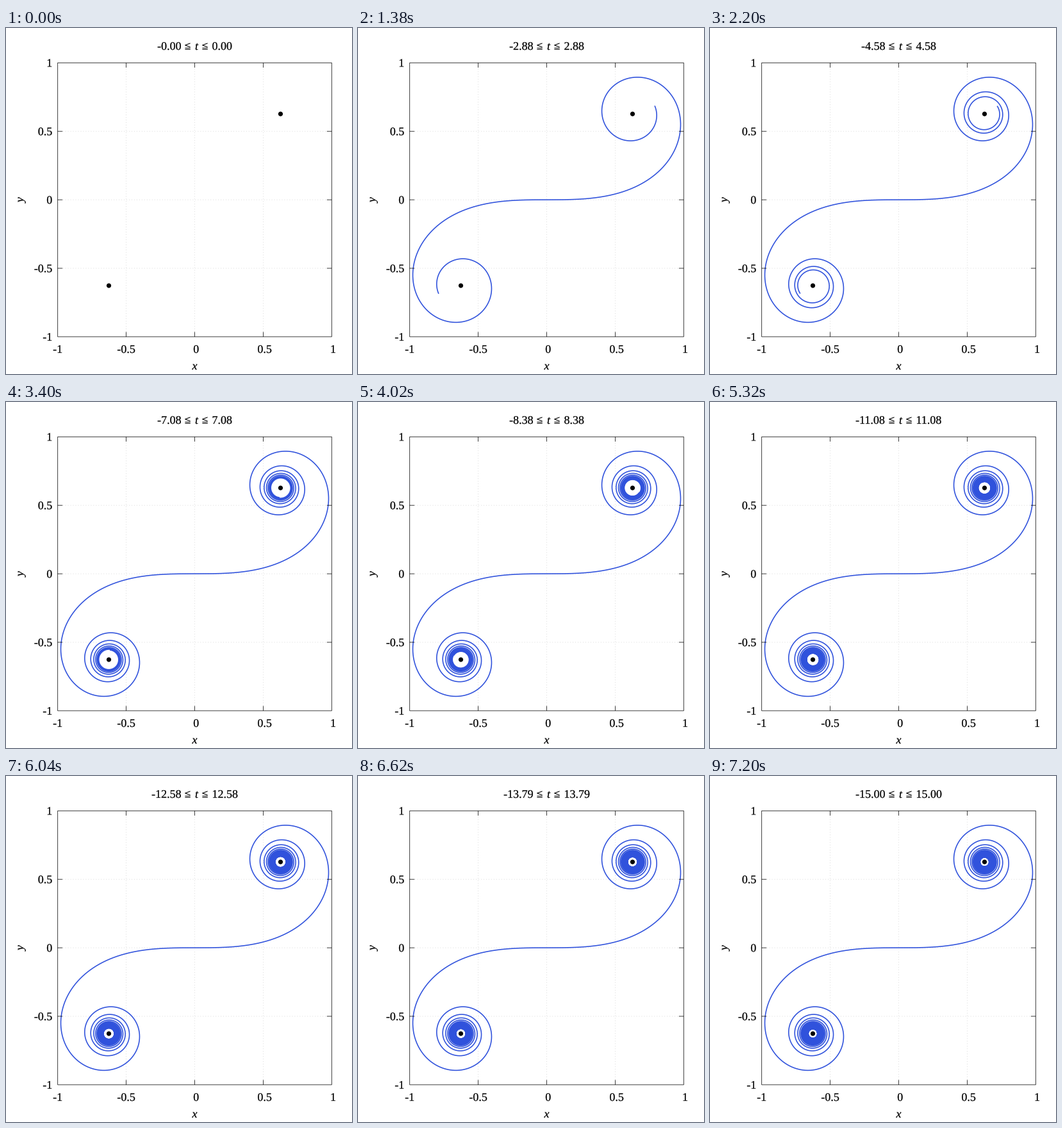
A matplotlib script that plays this animation: 540 px wide and 540 px high, repeating every 7.22 s.

```python
import numpy as np
import matplotlib.pyplot as plt
from matplotlib.animation import FuncAnimation
from matplotlib.patches import PathPatch
from matplotlib.textpath import TextPath
from matplotlib.transforms import Affine2D

SIZE, DPI = 540, 72
FRAMES, INTERVAL = 361, 20
T_MAX = 15
SUB = 24                      # integration steps per frame
CX, CY, UNIT = 294.5, 268.1, 213.8
BLUE = "#3052dc"
FONT = 18
THIN = 0.75

fig = plt.figure(figsize=(SIZE / DPI, SIZE / DPI), dpi=DPI, facecolor="white")
ax = fig.add_axes([0, 0, 1, 1])
ax.set(xlim=(0, SIZE), ylim=(SIZE, 0))
ax.axis("off")


def px(x):
    return CX + UNIT * x


def py(y):
    return CY - UNIT * y


def stroke(xs, ys, color="black", lw=THIN, **kw):
    return ax.plot(xs, ys, color=color, lw=lw, solid_capstyle="butt",
                   snap=False, **kw)[0]


def glyphs(s, style="normal"):
    return TextPath((0, 0), s, size=FONT,
                    prop=dict(family="Liberation Serif", style=style))


def place(patch, x, y, angle=0):
    move = Affine2D().rotate_deg(angle).scale(1, -1).translate(x, y)
    patch.set_transform(move + ax.transData)


def label(x, y, s, style="normal", angle=0):
    """Text outlines with their baseline origin at (x, y)."""
    patch = PathPatch(glyphs(s, style), fc="black", ec="black", lw=0.25,
                      snap=False, zorder=4)
    ax.add_patch(patch)
    place(patch, x, y, angle)
    return patch


def advance(s):
    """Width of a number in Times metrics."""
    em = {"-": 0.333, ".": 0.25}
    return FONT * sum(em.get(c, 0.5) for c in s)


def fresnel():
    """Running integrals of cos(s^2) and sin(s^2) by the midpoint rule."""
    n = (FRAMES - 1) * SUB
    h = T_MAX / n
    mid = (np.arange(n) + 0.5) * h
    return [np.concatenate([[0], np.cumsum(f(mid ** 2) * h)])
            for f in (np.cos, np.sin)]


def draw_axes():
    lo_x, hi_x, lo_y, hi_y = px(-1), px(1), py(-1), py(1)
    tick = 7.5
    for v in (-0.5, 0, 0.5):
        grid = dict(color="#d0d0d0", dashes=(1.3, 4), zorder=1)
        stroke([px(v)] * 2, [lo_y, hi_y], **grid)
        stroke([lo_x, hi_x], [py(v)] * 2, **grid)
        for edge, d in ((lo_y, -tick), (hi_y, tick)):
            stroke([px(v)] * 2, [edge, edge + d], zorder=4)
        for edge, d in ((lo_x, tick), (hi_x, -tick)):
            stroke([edge, edge + d], [py(v)] * 2, zorder=4)
    ax.add_patch(plt.Rectangle((lo_x, hi_y), hi_x - lo_x, lo_y - hi_y,
                               fill=False, ec="black", lw=THIN, snap=False,
                               zorder=4))
    for v in (-1, -0.5, 0, 0.5, 1):
        s = f"{v:g}"
        w = advance(s)
        shift = 2.25 if v >= 0 else 0
        label(px(v) - w / 2 + shift, 507, s)
        label(72.3 - w, py(v) + 6.1, s)
    label(290.5, 533, "x", "italic")
    label(27, 272, "y", "italic", 90)


def leq(x):
    """Less-than over a double bar."""
    stroke([x + 8.6, x + 0.6, x + 8.6], [23.8, 26.8, 29.8], lw=1.1)
    for y in (31.3, 33.4):
        stroke([x + 0.4, x + 8.8], [y, y], lw=1.0)


draw_axes()
leq(279)
leq(306)
label(295, 34, "t", "italic")
left = label(236, 34, "-0.00")
right = label(321.5, 34, "0.00")

C, S = fresnel()
curve = stroke([], [], BLUE, 1.6, zorder=3)
limit = np.sqrt(np.pi / 8)
for sign in (-1, 1):
    ax.add_patch(plt.Circle((px(sign * limit), py(sign * limit)), 3.6,
                            fc="black", lw=0, zorder=5))


def update(i):
    t = T_MAX * i / (FRAMES - 1)
    k = i * SUB + 1
    x = np.concatenate([-C[:k][::-1], C[1:k]])
    y = np.concatenate([-S[:k][::-1], S[1:k]])
    curve.set_data(px(x), py(y))
    s = f"{t:.2f}"
    left.set_path(glyphs("-" + s))
    place(left, 273.6 - advance("-" + s), 34)
    right.set_path(glyphs(s))
    return curve, left, right


anim = FuncAnimation(fig, update, frames=FRAMES, interval=INTERVAL,
                     repeat=True, repeat_delay=0, blit=False)
plt.show()
```
